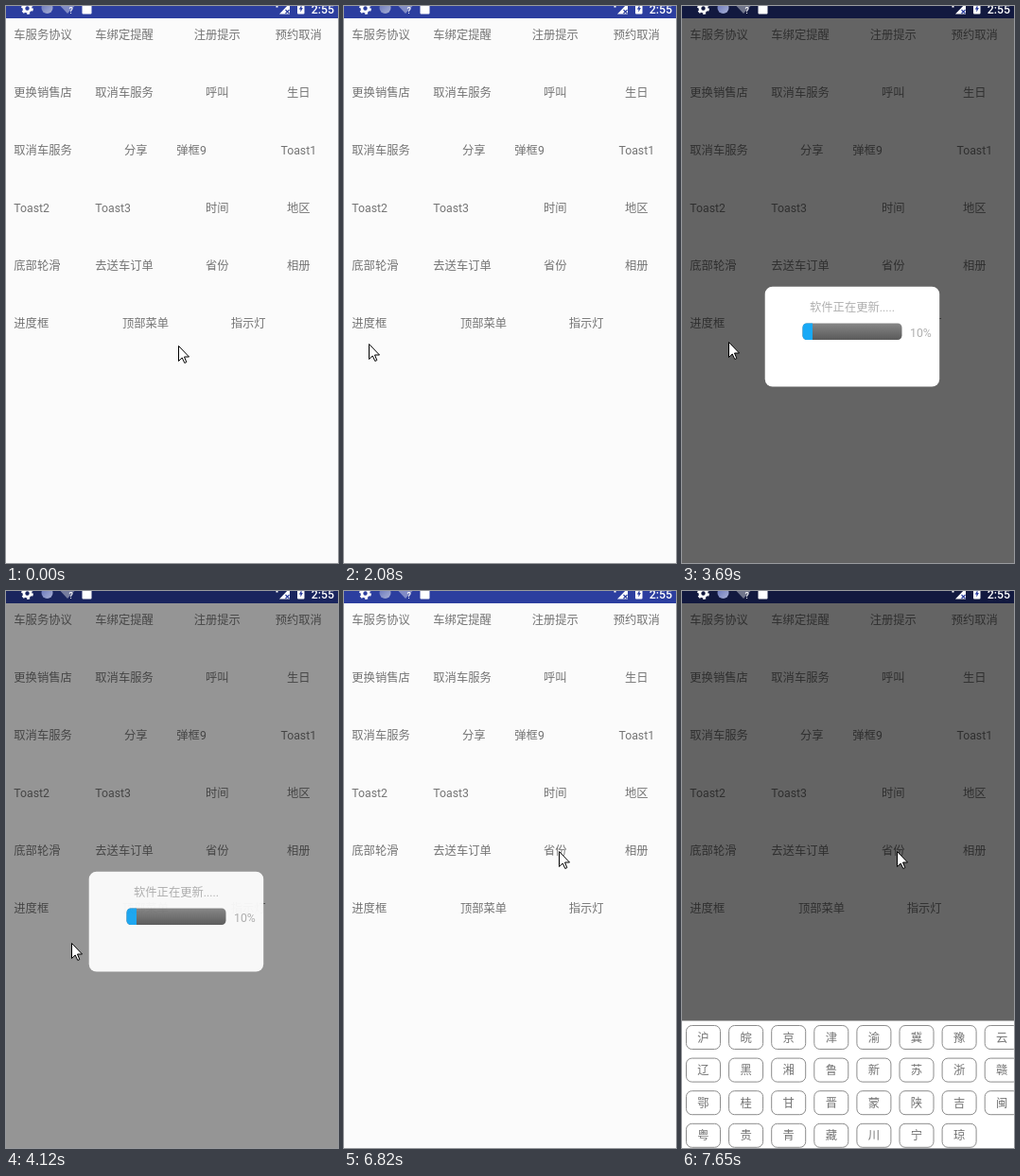
Recreate the animation shown at these times as an HTML page. Size 351 by 589 pixels, loop 8 s.

```html
<!DOCTYPE html>
<html lang="zh-CN">
<head>
<meta charset="utf-8">
<style>
  html, body { margin: 0; width: 100%; height: 100%; overflow: hidden; background: #fbfbfb; }
  svg { display: block; width: 351px; height: 589px; }
  text { font: 12.3px Roboto, "Noto Sans CJK SC", "Noto Sans CJK", sans-serif; fill: #747474; }
  .mid { text-anchor: middle; }
  #status text { font-weight: 500; fill: #fff; }
  #dialog text { fill: #b0b0b0; }
  #sheet rect { fill: #fff; }
  #sheet .key { stroke: #8c8c8c; }
</style>
</head>
<body>
<svg viewBox="0 0 351 589">
  <defs>
    <linearGradient id="track" x2="0" y2="1">
      <stop stop-color="#888"/>
      <stop offset="1" stop-color="#5a5a5a"/>
    </linearGradient>
    <linearGradient id="ball" x2="1" y2="1">
      <stop stop-color="#6573bb"/>
      <stop offset="1" stop-color="#a9b1d4"/>
    </linearGradient>
    <clipPath id="pill"><rect x="127.5" y="335.5" width="105" height="17.5" rx="4.5"/></clipPath>
  </defs>

  <rect width="351" height="589" fill="#fbfbfb"/>
  <g id="labels"></g>
  <rect width="351" height="13" fill="#2c3e9f"/>
  <rect id="dim" width="351" height="589"/>

  <g id="status" fill="#fff">
    <g fill="none" stroke="#fff">
      <circle cx="22.5" cy="2.5" r="3.6" stroke-width="2.8"/>
      <circle cx="22.5" cy="2.5" r="5.4" stroke-width="2" stroke-dasharray="2.83"/>
    </g>
    <circle cx="43.5" cy="2" r="6" fill="url(#ball)"/>
    <path d="M57.5 0Q65-5 72.5 0L65 8Z" opacity=".4"/>
    <text x="66.5" y="7.5" style="font-size:9px">?</text>
    <rect x="80.5" y="-3" width="10" height="11.5" rx="1"/>
    <path d="M285.500 0h2v1.500h-2zM289 8.500H300V-3Z"/>
    <path d="M295.500 4l4 4m0-4l-4 4" stroke="#2c3e9f" stroke-width="1.2"/>
    <rect x="308" y="-4" width="7.5" height="12.5" rx="1"/>
    <path d="M312.500-1L309.800 3.500H311.400V6.500L313.900 2H312.500Z" fill="#2c3e9f"/>
    <text x="322.8" y="7.5">2:55</text>
  </g>

  <g id="dialog">
    <rect x="87.7" y="296.700" width="184.5" height="105.8" rx="8" fill="#fff"/>
    <text class="mid" x="180" y="322.6">软件正在更新.....</text>
    <g clip-path="url(#pill)">
      <rect x="127" y="335" width="106" height="18" fill="url(#track)"/>
      <rect x="127" y="335" width="11" height="18" fill="#18a9f6"/>
    </g>
    <text x="241" y="349.7">10%</text>
  </g>

  <g id="sheet"><rect y="454.5" width="351" height="135"/></g>
  <path id="cursor" d="M.5.5V16.500L4.200 13 6.800 18.500 8.800 17.600 6.500 12H11.500Z" fill="#fff" stroke="#000"/>
</svg>

<script>
const NS = 'http://www.w3.org/2000/svg';
const TICK = 136.3; // the screen refreshes in coarse steps
const $ = id => document.getElementById(id);
const clamp = v => Math.min(1, Math.max(0, v));
const smooth = p => p * p * (3 - 2 * p);

function add(parent, tag, attrs, text = '') {
  const el = document.createElementNS(NS, tag);
  for (const k in attrs) el.setAttribute(k, attrs[k]);
  el.textContent = text;
  $(parent).append(el);
}

// Each row shares the width evenly; ^ centres a label in its cell
[
  '车服务协议 车绑定提醒 ^注册提示 ^预约取消',
  '更换销售店 取消车服务 ^呼叫 ^生日',
  '取消车服务 ^分享 弹框9 ^Toast1',
  'Toast2 Toast3 ^时间 ^地区',
  '底部轮滑 去送车订单 ^省份 ^相册',
  '进度框 顶部菜单 指示灯'
].forEach((line, r) => line.split(' ').forEach((label, c, row) => {
  const cell = 344 / row.length, mid = label[0] === '^';
  const x = 8.3 + cell * (mid ? c + 0.5 : c);
  add('labels', 'text', { x, y: 34.6 + 61 * r, class: mid ? 'mid' : '' }, label.replace('^', ''));
}));

// Province keys
['沪皖京津渝冀豫云', '辽黑湘鲁新苏浙赣', '鄂桂甘晋蒙陕吉闽', '粤贵青藏川宁琼'].forEach((line, r) =>
  [...line].forEach((char, c) => {
    const x = 4.5 + 45.1 * c, y = 459.5 + 34.6 * r;
    add('sheet', 'rect', { class: 'key', x, y, width: 36, height: 25, rx: 6 });
    add('sheet', 'text', { class: 'mid', x: x + 18, y: y + 17 }, char);
  }));

// Pointer moves: first tick, last tick, destination
const moves = [
  [0, 4, 235, 527], [4, 8, 240, 549], [8, 10, 232, 313], [13, 15, 26, 357],
  [15, 18, 28, 338], [26, 28, 69, 372], [32, 36, 143, 334], [44, 50, 227, 275]
];

function pointer(n) {
  let x = 182, y = 359;
  for (const [from, to, toX, toY] of moves) {
    const p = smooth(clamp((n - from) / (to - from)));
    x += (toX - x) * p;
    y += (toY - y) * p;
  }
  return [Math.round(x), Math.round(y)];
}

const place = (id, x, y) => $(id).setAttribute('transform', `translate(${x} ${y})`);

function draw(now) {
  const n = Math.floor(now % 8000 / TICK);
  const enter = clamp((n - 21.4) / 2.6);
  const dialog = Math.min(enter, clamp((31 - n) * 0.68));
  const sheet = clamp((n - 54) / 2);

  $('dim').setAttribute('opacity', 0.6 * Math.max(dialog, sheet));
  $('dialog').setAttribute('opacity', 1 - (1 - dialog) ** 2.5);
  place('dialog', 0, 13 * (1 - enter));
  place('sheet', 0, 135 * (1 - sheet));
  place('cursor', ...pointer(n));
  requestAnimationFrame(draw);
}
draw(performance.now());
</script>
</body>
</html>
```
